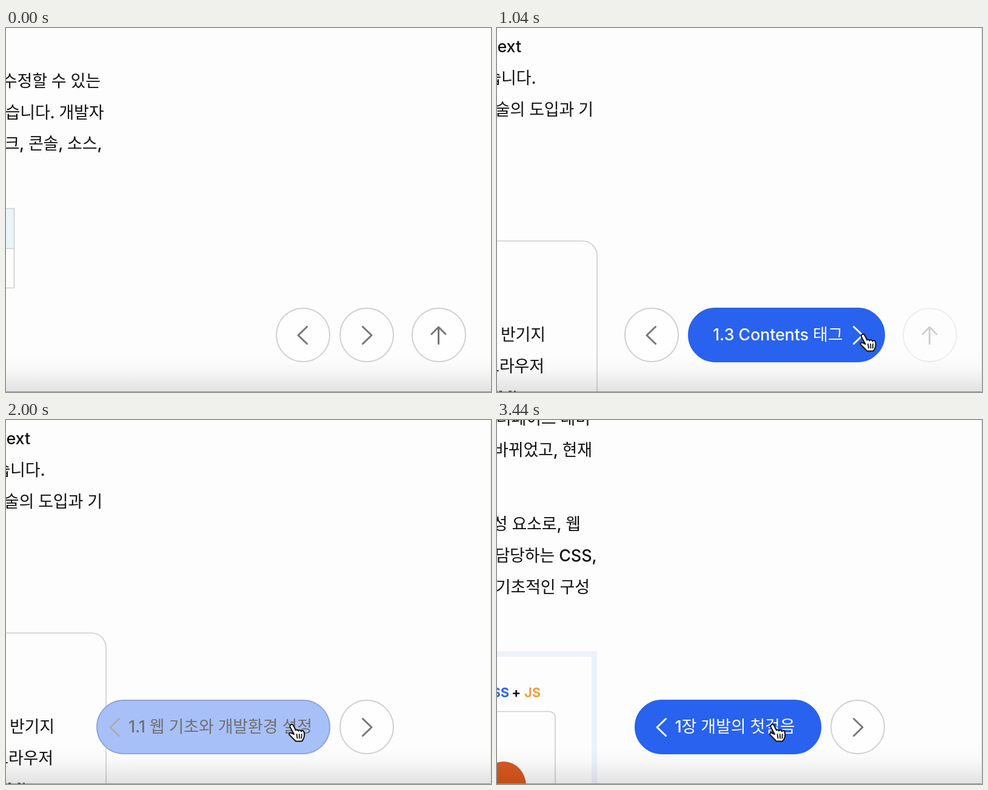
An HTML page for the animation above (3520 ms loop, 800x600 px).

```html
<!DOCTYPE html>
<html lang="ko">
<head>
<meta charset="utf-8">
<title>Page navigation buttons</title>
<style>
  html, body { margin: 0; width: 100%; height: 100%; overflow: hidden; background: #fdfdfd; }
  body { position: relative; font: 500 27px Inter, "Noto Sans CJK KR", "Noto Sans CJK", sans-serif; letter-spacing: -.15px; }
  svg { position: absolute; overflow: visible; }
  #stage { position: absolute; left: 0; top: 0; width: 800px; height: 600px; overflow: hidden; }
  #pages { left: 0; top: 0; }
  #pages text { text-anchor: end; fill: #111; }
  .line { fill: none; stroke: #cdd0d3; stroke-width: 1.7; }
  .shade { position: absolute; left: 0; right: 0; top: 540px; height: 60px;
    background: linear-gradient(rgba(0,0,0,0), rgba(0,0,0,.025) 40%, rgba(0,0,0,.11)); }
  .floor { position: absolute; left: 0; right: 0; bottom: 0; height: 1px; background: #8f8f8f; }
  #edge { position: absolute; right: 0; top: 0; width: 1px; height: 600px; background: #dedede; }
  .pill { position: absolute; top: 461px; width: 90px; height: 90px; box-sizing: border-box;
    border: 2px solid; border-radius: 45px; }
  .label { position: absolute; top: 461px; height: 90px; line-height: 90px; overflow: hidden; white-space: nowrap; }
  .icon { left: 0; top: 0; fill: none; stroke: #777; stroke-width: 3; stroke-linecap: round; stroke-linejoin: round; }
  #up .pill { left: 669px; border-color: #d2d2d2; background: #fefefe; }
</style>
</head>
<body>
<div id="stage">
  <svg id="pages" width="800" height="600">
    <g>
      <text x="156" y="96.5">수정할 수 있는</text>
      <text x="161.5" y="148.5">있습니다. 개발자</text>
      <text x="158.5" y="200">워크, 콘솔, 소스,</text>
      <path d="M-5 297.5H13.5V363.5H-5Z" fill="#ebf4f8"/>
      <path class="line" d="M-5 297.5H13.5V428.5H-5M-5 363.5H13.5"/>
    </g>
    <g>
      <text x="40" y="40">Hypertext</text>
      <text x="64.5" y="92">있습니다.</text>
      <text x="159" y="143.5">기술의 도입과 기</text>
      <path class="line" d="M-5 351H141A24 24 0 0 1 165 375V610"/>
      <text x="80" y="515">을 반기지</text>
      <text x="78" y="566.5">브라우저</text>
      <text x="41" y="618">HTML</text>
    </g>
    <g>
      <text x="154" y="6">터페이스 대비</text>
      <text x="157" y="58">바뀌었고, 현재</text>
      <text x="138" y="180">구성 요소로, 웹</text>
      <text x="164.5" y="231.5">담당하는 CSS,</text>
      <text x="153" y="283.5">기초적인 구성</text>
      <path d="M-5 384.5H160.7V610" fill="none" stroke="#edf2f9" stroke-width="9"/>
      <g font-size="22" font-weight="700">
        <text x="20" y="456" style="fill:#2f66e4">CSS</text>
        <text x="39" y="456">+</text>
        <text x="72" y="456" style="fill:#e9a340">JS</text>
      </g>
      <path class="line" d="M-5 479.5H86A10 10 0 0 1 96 489.5V610"/>
      <ellipse cx="11" cy="602" rx="37" ry="40" fill="#d9581f"/>
    </g>
  </svg>
  <div class="shade"></div>
  <div class="floor"></div>
  <div id="edge"></div>
  <div id="up">
    <div class="pill"></div>
    <svg class="icon" width="1" height="1"><path d="M713.5 520.5V493M702 504.5L713.5 493L725 504.5"/></svg>
  </div>
  <div id="nav"></div>
  <svg id="cursor" width="28" height="34" stroke-linejoin="round" stroke-linecap="round">
    <g id="hand">
      <path d="M4 3C2 4 2 6 3 8L9 19L5 17C1 15.500 0 18.500 2 20.500L12 30.500H22C25 27 27 22 25.800 16C25 12.500 22 12 21 14.500C20 11.500 17 11.500 16 13.500C15 11 13 11 12 12.500L8 4.500C7 2.500 5.500 2.200 4 3Z" fill="#fff" stroke="#111" stroke-width="2"/>
      <path d="M13.500 19L14.500 25.500M17.700 19L18 25.500M21.700 19L21.300 25.500" fill="none" stroke="#111" stroke-width="1.800"/>
    </g>
    <path id="arrow" d="M3 2V24L8 19.500L12 28L15.500 26.500L11.700 18H19Z" fill="#111" stroke="#fff" stroke-width="1.800"/>
  </svg>
</div>
<script>
const LOOP = 3520, STEP = 80;
const BLUE = [40, 98, 239], WHITE = [255, 255, 255];
const $ = id => document.getElementById(id);
const pages = [...$('pages').children];

// page start time, then label and open width of each button
const views = [
  { at: 0, next: ['1.2 HTML Living Standard 태그', 493] },
  { at: 960, next: ['1.3 Contents 태그', 325], prev: ['1.1 웹 기초와 개발환경 설정', 414] },
  { at: 2720, prev: ['1장 개발의 첫걸음', 308.5] }
];
// [time, value...]
const hoverNext = [[240, 0], [520, 1], [1540, 1], [1800, 0]];
const hoverPrev = [[1880, 0], [2180, 1]];
const upFade = [[960, 1], [1080, 0]];
const path = [[80, 640, 440], [320, 598.5, 502], [1440, 598.5, 502], [1600, 562, 424],
  [1680, 540, 430], [1880, 478, 496], [2000, 466, 499], [2160, 449, 499]];

const clamp = v => Math.max(0, Math.min(1, v));
const mix = (a, b, k) => 'rgb(' + a.map((v, i) => Math.round(v + (b[i] - v) * k)) + ')';

function track(keys, t, col = 1) {
  let a = keys[0];
  for (const b of keys) {
    if (t < b[0]) return b === a ? a[col] : a[col] + (b[col] - a[col]) * (t - a[0]) / (b[0] - a[0]);
    a = b;
  }
  return a[col];
}

function makeButton(d) {
  const box = document.createElement('div');
  box.innerHTML = '<div class="pill"></div><div class="label"></div>' +
    `<svg class="icon" width="1" height="1"><path d="${d}"/></svg>`;
  $('nav').append(box);
  const [pill, label, icon] = box.children;
  return { pill, label, icon };
}
const prev = makeButton('M7.5 492.5L-7 506.5L7.5 520.5');
const next = makeButton('M-7.5 492.5L7 506.5L-7.5 520.5');

// Lays out one button from its right edge and returns its left edge.
function drawButton(b, right, [text, open], k, isNext) {
  const q = clamp(k / 0.4);
  const tight = 14 * Math.min(q, (1 - k) / 0.6);
  const width = 90 + (open - 90) * q - 2 * tight;
  const left = right - width;
  const start = (isNext ? 41 : 67) - tight;
  const end = (isNext ? 61 : 36) - tight;
  Object.assign(b.pill.style, {
    left: left + 'px', width: width + 'px',
    background: mix([254, 254, 254], BLUE, k),
    borderColor: mix([210, 210, 210], BLUE, k)
  });
  if (b.label.textContent !== text) b.label.textContent = text;
  Object.assign(b.label.style, {
    left: left + start + 'px', width: Math.max(0, width - start - end) + 'px',
    color: mix([17, 17, 17], WHITE, k)
  });
  b.icon.style.left = (isNext ? right - 44 + tight : left + 44 - tight) + 'px';
  b.icon.style.stroke = mix([119, 119, 119], WHITE, k);
  return left;
}

function draw(t) {
  let n = 0;
  views.forEach((v, i) => { if (t >= v.at) n = i; });
  pages.forEach((p, i) => { p.style.display = i === n ? '' : 'none'; });
  pages[2].setAttribute('transform', `translate(0 ${t >= 3120 ? 1 : 0})`);
  $('edge').style.display = n ? '' : 'none';
  $('up').style.opacity = track(upFade, t);

  const kn = track(hoverNext, t), kp = track(hoverPrev, t);
  const left = drawButton(next, 640, views[n].next || ['', 90], kn, true);
  drawButton(prev, left - 15, views[n].prev || ['', 90], kp, false);

  const over = (t >= 240 && t < 1540) || t >= 1840;
  $('cursor').style.display = t < 80 ? 'none' : '';
  $('cursor').style.transform = `translate(${track(path, t)}px, ${track(path, t, 2)}px)`;
  $('cursor').style.left = $('cursor').style.top = 0;
  $('hand').style.display = over ? '' : 'none';
  $('arrow').style.display = over ? 'none' : '';
}

const begin = performance.now();
function tick() {
  const t = (performance.now() - begin) % LOOP;
  draw(Math.floor(t / STEP) * STEP);
  requestAnimationFrame(tick);
}
tick();
</script>
</body>
</html>
```
